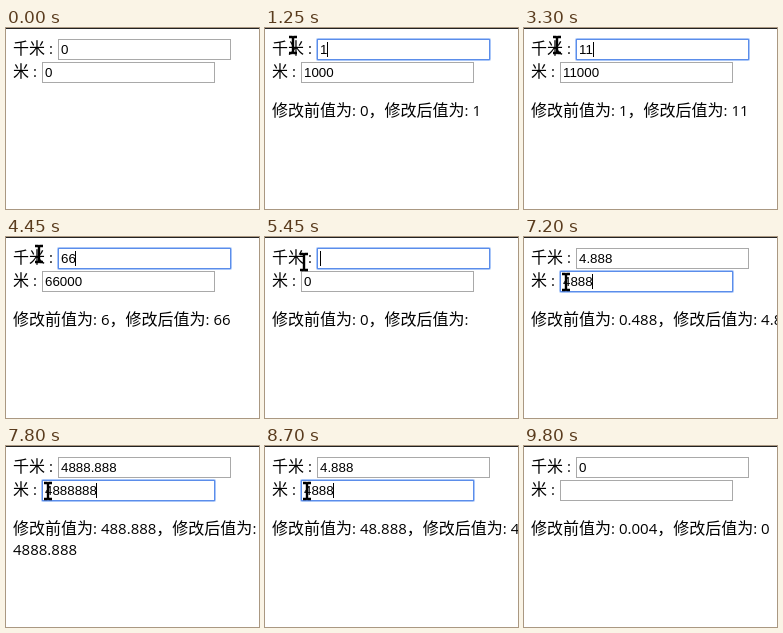
Recreate the animation shown at these times as an HTML page. Size 253 by 181 pixels, loop 9.85 s.

```html
<!DOCTYPE html>
<html lang="zh-CN">
<head>
<meta charset="utf-8">
<style>
html, body { margin: 0; width: 100%; height: 100%; overflow: hidden; background: #fff; }
svg { display: block; }
text { white-space: pre; font: 15px "Open Sans", "Noto Sans", sans-serif; }
.han { font: 16px "Noto Sans CJK SC", "Noto Sans CJK", sans-serif; }
.value { font: 13.333px "Liberation Sans", Arial, sans-serif; }
.box { fill: #fff; stroke: #a9a9a9; }
.ring { fill: none; stroke: #a9c6f8; }
.focus .box { stroke: #5b8dea; }
.select { fill: #3390ff; }
</style>
</head>
<body>
<svg id="stage" width="253" height="181" viewBox="0 0 253 181">
  <rect width="253" height="1" fill="#222"/>
  <g id="fields"></g>
  <text id="line1" x="7" y="88"></text>
  <text id="line2" x="7" y="109"></text>
  <g id="cursor">
    <path id="beam" d="M-4-8h3l1 1 1-1h3M0-7V7M-4 8h3l1-1 1 1h3" fill="none" stroke="#000" stroke-width="2.4"/>
    <path id="arrow" d="M.5.5v16l3.7-3.5 2.5 5.6 2.4-1-2.5-5.6h5.2z" fill="#fff" stroke="#000"/>
  </g>
</svg>
<script>
const LOOP = 9850, STEP = 50, DIGIT = 7.415;
const $ = id => document.getElementById(id);

// time, kilometres, metres (kilometres * 1000 when left out)
const edits = [
  [0, '0'], [1250, '1'], [1600, '11'], [3950, '1'], [4050, '0'], [4300, '6'],
  [4450, '66'], [4900, '6'], [5050, '0'], [5150, ''],
  [6650, '0.004'], [6800, '0.048'], [6900, '0.488'], [7200, '4.888'],
  [7350, '48.888'], [7450, '488.888'], [7800, '4888.888'],
  [8300, '488.888'], [8650, '48.888'], [8683, '4.888'], [8717, '0.488'],
  [8750, '0.048'], [8783, '0.004'], [8817, '0'], [8850, '0', '']
];

// time, x, y of the pointer
const path = [
  [0, -50, -50], [50, 130, 14], [300, 66, 27], [450, 62, 26], [650, 28, 17],
  [2150, 28, 17], [2200, 33, 17], [5400, 33, 17], [5700, 70, 63],
  [5950, 83, 47], [6000, 70, 47], [6100, 42, 45],
  [9350, 42, 45], [9550, 170, 32], [9700, 237, 8], [9800, 275, 14], [LOOP, 275, 14]
];

const caretOff = [[2050, 2500], [2900, 3300], [3750, 3950], [4850, 4900],
  [5600, 6000], [8250, 8300], [9250, 9650]];

const fields = [
  { label: '千米 : ', x: 52, y: 11, focusTime: [350, 6000], selectTime: [500, 1250] },
  { label: '米 : ', x: 36, y: 34, focusTime: [6000, 9700], selectTime: [6100, 6650] }
];

const within = (t, [a, b]) => t >= a && t < b;
const mark = s => s.replace(/[^\x00-\x7f]+/g, '<tspan class="han">$&</tspan>');
const show = (el, on) => el.setAttribute('visibility', on ? 'visible' : 'hidden');
const width = s => [...s].reduce((w, c) => w + (c === '.' ? DIGIT / 2 : DIGIT), 0);

for (const f of fields) {
  const g = document.createElementNS('http://www.w3.org/2000/svg', 'g');
  $('fields').append(g);
  g.innerHTML = `<text x="7" y="${f.y + 15}">${mark(f.label)}</text>
    <rect class="ring" x="${f.x - .5}" y="${f.y - .5}" width="174" height="22" rx="1"/>
    <rect class="box" x="${f.x + .5}" y="${f.y + .5}" width="172" height="20"/>
    <rect class="select" x="${f.x + 3}" y="${f.y + 3}" height="15"/>
    <text class="value" x="${f.x + 3}" y="${f.y + 15}"></text>
    <rect class="caret" y="${f.y + 3}" width="1" height="15"/>`;
  f.group = g;
  for (const part of ['ring', 'select', 'value', 'caret']) f[part] = g.querySelector('.' + part);
}

function drawField(f, value, t) {
  const focus = within(t, f.focusTime), selected = within(t, f.selectTime), w = width(value);
  f.group.setAttribute('class', focus ? 'focus' : '');
  show(f.ring, focus);
  show(f.select, selected);
  f.select.setAttribute('width', w);
  f.value.textContent = value;
  f.value.setAttribute('fill', selected ? '#fff' : '#000');
  f.caret.setAttribute('x', Math.floor(f.x + 3 + w));
  show(f.caret, focus && !selected && !caretOff.some(r => within(t, r)));
}

function drawPointer(t) {
  const i = path.findIndex(p => p[0] > t);
  const [t0, x0, y0] = path[i - 1], [t1, x1, y1] = path[i];
  const k = (t - t0) / (t1 - t0);
  const x = Math.round(x0 + (x1 - x0) * k), y = Math.round(y0 + (y1 - y0) * k);
  const overText = y > 9 && y < 56 && x < (y > 32 ? 209 : 225);
  $('cursor').setAttribute('transform', `translate(${x} ${y})`);
  show($('beam'), overText);
  show($('arrow'), !overText);
}

function draw(now) {
  const t = Math.floor(now % LOOP / STEP) * STEP;
  let km = '0', m = '0', old = null;
  for (const [time, value, metres] of edits) {
    if (time > t) break;
    if (value !== km) old = km;
    km = value;
    m = metres ?? String(Math.round(km * 1000));
  }
  drawField(fields[0], km, t);
  drawField(fields[1], m, t);

  const wrap = old !== null && old.length + km.length > 13;
  $('line1').innerHTML = old === null ? '' :
    mark(`修改前值为: ${old}，修改后值为: ${wrap ? '' : km}`);
  $('line2').textContent = wrap ? km : '';
  drawPointer(t);
}

const start = performance.now();
function frame() {
  draw(performance.now() - start);
  requestAnimationFrame(frame);
}
frame();
</script>
</body>
</html>
```
